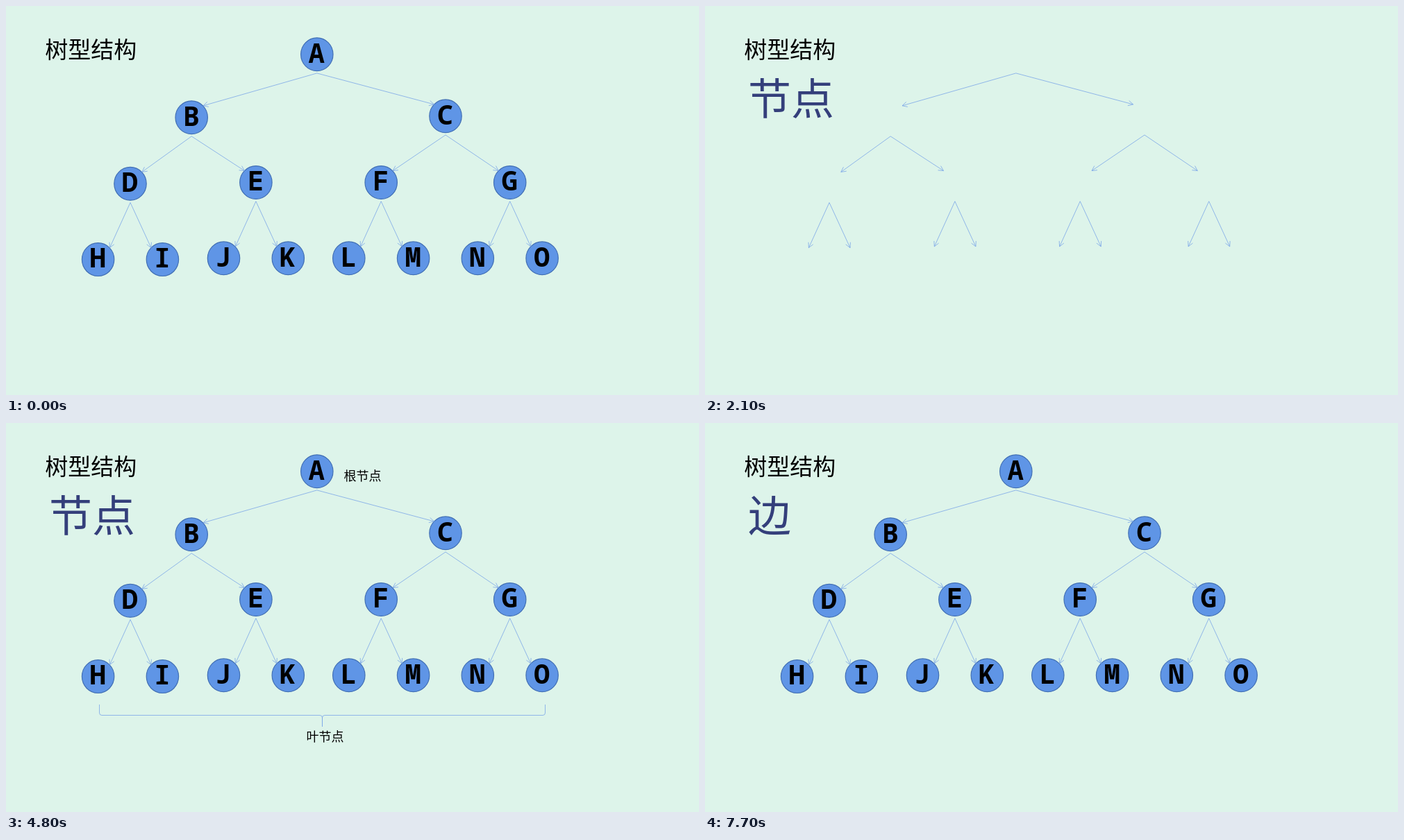
These frames come from a looping animation (998x561 px, 8000 ms). An HTML page with a canvas:

```html
<!DOCTYPE html>
<html lang="zh-CN">
<head>
<meta charset="utf-8">
<style>
html, body { margin: 0; width: 100%; height: 100%; overflow: hidden; background: #ddf4ea; }
canvas { display: block; }
</style>
</head>
<body>
<canvas width="998" height="561"></canvas>
<script>
const ctx = document.querySelector('canvas').getContext('2d');
const WIDTH = 998, HEIGHT = 561, LOOP = 8000, STEP = 300;
const CJK = '"Noto Sans CJK SC", "Noto Sans CJK", sans-serif';
const LINE = '#7ba6e8', HEADING = '#343f7b';

// Binary tree in heap order: the inner nodes are placed, the leaves hang below them.
const nodes = [
  [447.8, 69.7],
  [267.2, 160.7], [633, 158.8],
  [179, 256.3], [359.9, 254.5], [540.2, 254.5], [725.7, 254.5]
];
for (const [x, y] of nodes.slice(3)) {
  nodes.push([x - 46.4, y + 109.3], [x + 46.4, y + 109.3]);
}

function text(str, x, y, font, color = '#000', align = 'left') {
  ctx.font = font;
  ctx.fillStyle = color;
  ctx.textAlign = align;
  ctx.fillText(str, x, y);
}

function strokeLine(path) {
  ctx.strokeStyle = LINE;
  ctx.lineWidth = 0.8;
  ctx.stroke(path);
}

function drawNode([x, y], i) {
  ctx.beginPath();
  ctx.ellipse(x, y, 23.2, 23.9, 0, 0, Math.PI * 2);
  ctx.fillStyle = '#5f95e6';
  ctx.fill();
  ctx.strokeStyle = '#416fb4';
  ctx.lineWidth = 1.2;
  ctx.stroke();
  text(String.fromCharCode(65 + i), x - 0.5, y + 11.8,
    'bold 39px "Noto Sans Mono", monospace', '#000', 'center');
}

// Arrow from below the parent to the rim of node i; odd nodes are left children.
function drawEdge(i) {
  const [px, py] = nodes[(i - 1) >> 1];
  const [x, y] = nodes[i];
  const startY = py + 27.2;
  const tipX = x + (i % 2 ? 16.8 : -16.4), tipY = y - 16.9;
  const angle = Math.atan2(tipY - startY, tipX - px);
  const barb = side => [tipX - 8 * Math.cos(angle + side), tipY - 8 * Math.sin(angle + side)];
  const path = new Path2D();
  path.moveTo(px, startY);
  path.lineTo(tipX, tipY);
  path.moveTo(...barb(0.48));
  path.lineTo(tipX, tipY);
  path.lineTo(...barb(-0.48));
  strokeLine(path);
}

// Runs draw() with only the left part of a span visible.
function wipe(x, width, amount, draw) {
  if (amount <= 0) return;
  ctx.save();
  ctx.beginPath();
  ctx.rect(x, 0, width * Math.min(amount, 1), HEIGHT);
  ctx.clip();
  draw();
  ctx.restore();
}

function drawBracket(left, right, top) {
  const mid = (left + right) / 2, bar = top + 15.5, r = 3.5;
  const path = new Path2D();
  for (const end of [left, right]) {
    path.moveTo(end, top);
    path.arcTo(end, bar, mid, bar, r);
    path.arcTo(mid, bar, mid, bar + 16, r);
    path.lineTo(mid, bar + 16.5);
  }
  strokeLine(path);
}

// Number of steps begun since a moment.
const steps = (t, start) => Math.floor((t - start) / STEP) + 1;
const blinkOff = (t, start, end) => t >= start && t < end && steps(t, start) % 2 === 1;

function drawLabels(t) {
  wipe(485, 57, steps(t, 3300) / 3, () => text('根节点', 486.5, 83, '300 18px ' + CJK));
  if (t >= 4200) text('叶节点', 432.5, 458.5, '300 18px ' + CJK);
  wipe(133, 645, steps(t, 4200) / 3, () => drawBracket(134.5, 776.5, 406));
}

function render(t) {
  ctx.fillStyle = '#ddf4ea';
  ctx.fillRect(0, 0, WIDTH, HEIGHT);
  text('树型结构', 56.3, 75, '33px ' + CJK);

  if (!blinkOff(t, 1500, 3000)) nodes.forEach(drawNode);
  if (!blinkOff(t, 6800, 7700)) {
    for (let i = 1; i < nodes.length; i++) drawEdge(i);
  }

  if (t >= 5800) text('边', 62, 157, '62px ' + CJK, HEADING);
  else if (t >= 500) {
    text('节点', 62, 157, '500 62px ' + CJK, HEADING);
    drawLabels(t);
  }
}

function tick() {
  render(performance.now() % LOOP);
  requestAnimationFrame(tick);
}
tick();
</script>
</body>
</html>
```
